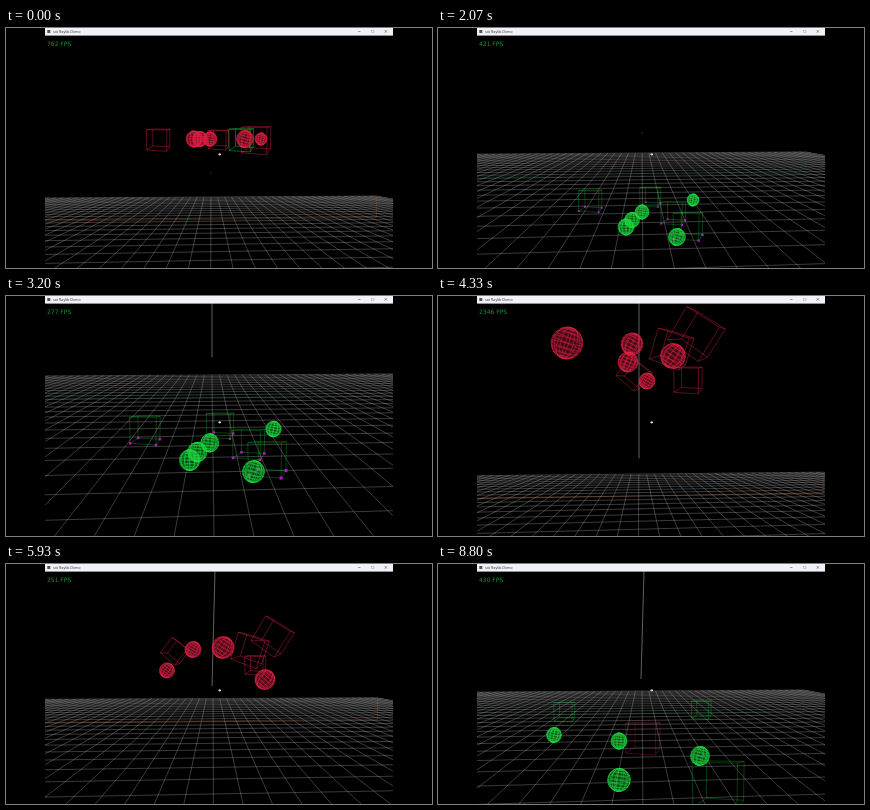
Animation, 426 px wide and 240 px high, one loop 8870 ms. Source, as an HTML page with a canvas:

```html
<!DOCTYPE html>
<html lang="en">
<head>
<meta charset="utf-8">
<title>Physics demo</title>
<style>
html, body { margin: 0; width: 100%; height: 100%; overflow: hidden; background: #000; }
canvas { display: block; width: 100vw; height: 100vh; }
</style>
</head>
<body>
<canvas id="stage"></canvas>
<script>
const canvas = document.getElementById('stage');
const ctx = canvas.getContext('2d');
const W = 426, H = 240, LOOP = 8870, STEPS = 133;
const CX = 213, CY = 126, FOCAL = 204, EYE = 4.6, HALF = 25;
const RED = '226,36,72', GREEN = '30,222,66', ORANGE = '170,92,36';
const LANDED = 22, LAUNCH = 54, SETTLED = 109;

const mix = (a, b, k) => a + (b - a) * k;
const clamp = k => Math.max(0, Math.min(1, k));
const smooth = k => k * k * (3 - 2 * k);
const linear = k => k;
const easeIn = k => k * k;
const easeOut = k => 1 - (1 - k) ** 2;

// Stops are [step, values, easing towards this stop].
function sample(stops, step) {
  let i = 1;
  while (i < stops.length - 1 && step >= stops[i][0]) i++;
  const [from, a] = stops[i - 1], [to, b, ease = smooth] = stops[i];
  const k = ease(clamp((step - from) / (to - from)));
  return a.map((v, n) => mix(v, b[n], k));
}

// Far edge of the floor, its vanishing point, and the frame rate
const camera = [
  [0, [169, 205, 762]],
  [31, [125, 204, 421]],
  [48, [79, 206, 277]],
  [65, [178, 201, 2346]],
  [89, [134.5, 207, 251]],
  [113, [127, 204, 781]],
  [132, [127, 204, 430]]
];

// Points are [x, y below the far edge, radius]; every body drops, is tossed and lands.
function body(rest, toss, fall, land, roll, spin = 0) {
  const [x, y, r] = rest;
  const near = [mix(205, x, 1.25), y * 1.15, r * 1.3];
  const end = [land[0] + roll, land[1], land[2]];
  const stops = [
    [0, [x, -58, r]], [15, rest, easeIn], [31, rest], [48, near], [LAUNCH, near],
    [65, toss, easeOut], [89, fall, linear], [107, land, easeIn], [113, land], [132, end, easeOut]
  ];
  return { stops, spin };
}

const balls = [
  body([188, 74, 8], [129, -131, 16], [20, -185, 16], [-40, -100, 16], 0),
  body([194, 67, 7.5], [190, -112, 10], [187, -49, 8], [181, 50, 8], 0),
  body([204, 59, 7], [194, -130, 11], [217, -51, 11], [197, 89, 11.5], -16),
  body([255, 47, 6], [209, -93, 8], [161, -28, 7.5], [130, 44, 7.5], -14),
  body([239, 84, 8.5], [235, -118, 12.5], [259, -19, 10], [260, 65, 9.5], 2)
];
const boxes = [
  body([153, 47, 9.5], [197, -100, 11], [170, -47, 9], [136, 20, 8.5], -9, .65),
  body([213, 43, 8.5], [251, -95, 11.5], [250, -34, 8.5], [264, 18, 8], 0),
  body([251, 72, 12], [260, -140, 18], [268, -62, 13.5], [279, 92, 21], 3, .55)
];
const marked = body([236, 59, 10], [235, -126, 15], [245, -49, 13], [210, 46, 14], -4, .3);

function line(x1, y1, x2, y2, color, width = .6) {
  ctx.strokeStyle = color;
  ctx.lineWidth = width;
  ctx.beginPath();
  ctx.moveTo(x1, y1);
  ctx.lineTo(x2, y2);
  ctx.stroke();
}

function text(s, x, y, font, color) {
  ctx.font = font;
  ctx.fillStyle = color;
  ctx.fillText(s, x, y);
}

const turn2 = (a, b, t) => [a * Math.cos(t) - b * Math.sin(t), a * Math.sin(t) + b * Math.cos(t)];

function rotate([x, y, z], yaw, tilt, roll) {
  [z, x] = turn2(z, x, yaw);
  [y, z] = turn2(y, z, tilt);
  [x, y] = turn2(x, y, roll);
  return [x, y, z];
}

function drawFloor(edge, mid, depth, rim) {
  const yaw = Math.atan((CX - mid) / FOCAL);
  const pitch = Math.atan((edge - CY) / FOCAL) - Math.atan(EYE / depth);
  const project = (x, z) => {
    const [px, pz] = turn2(x, z, yaw);
    const [d, y] = turn2(pz, EYE, pitch);
    return [CX + FOCAL * px / d, CY + FOCAL * y / d];
  };
  const color = 'rgba(195,195,195,.6)';
  for (let x = -HALF; x <= HALF; x++) line(...project(x, depth), ...project(x, 3), color, .5);
  for (let z = depth; z > 3; z--) line(...project(-HALF, z), ...project(HALF, z), color, .5);

  const [x, y] = project(HALF, depth);
  line(39, edge + 24, x, y + 21.5, rim);
  line(x, y + 21.5, x, y, rim);
}

function drawBall([x, y, r], turn, color) {
  ctx.fillStyle = `rgba(${color},.3)`;
  ctx.beginPath();
  ctx.arc(x, y, r, 0, 7);
  ctx.fill();
  ctx.strokeStyle = `rgba(${color},.78)`;
  ctx.lineWidth = .6;
  const ring = point => {
    ctx.beginPath();
    for (let i = 0; i <= 24; i++) {
      const [px, py] = rotate(point(i * Math.PI / 12), turn, .15, turn * .1);
      ctx.lineTo(x + px * r, y + py * r);
    }
    ctx.stroke();
  };
  for (let i = 1; i < 9; i++) {
    const a = i * Math.PI / 9;
    ring(b => [Math.sin(a) * Math.cos(b), Math.cos(a), Math.sin(a) * Math.sin(b)]);
  }
  for (let i = 0; i < 6; i++) {
    const a = i * Math.PI / 6;
    ring(b => [Math.sin(b) * Math.cos(a), Math.cos(b), Math.sin(b) * Math.sin(a)]);
  }
}

function drawBox([x, y, s], roll, color, touching) {
  const corners = [];
  for (let i = 0; i < 8; i++) {
    const c = [i & 1, i >> 1 & 1, i >> 2].map(v => v * 2 - 1);
    const [px, py, pz] = rotate(c, .25, .14, roll);
    const k = s / (1 + pz * .1);
    corners.push([x + px * k, y + py * k]);
  }
  corners.forEach((p, i) => {
    for (const bit of [1, 2, 4]) if (!(i & bit)) line(...p, ...corners[i | bit], color);
  });
  if (!touching) return;
  const size = s / 5;
  ctx.fillStyle = 'rgba(214,20,220,.85)';
  corners.forEach(([px, py], i) => {
    if (i & 2) ctx.fillRect(px - size / 2, py - size / 2, size, size);
  });
}

function drawWindow(fps) {
  ctx.fillStyle = '#f1f2f8';
  ctx.fillRect(39, 0, 348, 7.6);
  ctx.fillStyle = '#555';
  ctx.fillRect(41.3, 2, 3, 3);
  text('sat Raylib Demo', 47, 4.9, '3.7px "Open Sans", sans-serif', '#333');
  line(352, 3.5, 354.6, 3.5, '#444', .5);
  ctx.strokeStyle = '#aaa';
  ctx.strokeRect(365.7, 2.3, 2.3, 2.3);
  line(378.6, 2.2, 381, 4.6, '#333', .5);
  line(381, 2.2, 378.6, 4.6, '#333', .5);
  text(Math.round(fps) + ' FPS', 41, 18.3, '6px "DejaVu Sans", sans-serif', '#0a9a38');
}

function draw(step) {
  const [edge, mid, fps] = sample(camera, step);
  const awake = step < LANDED || step >= LAUNCH && step < SETTLED;
  const color = awake ? RED : GREEN;
  const depth = 30.2 - 4 * Math.exp(-(((step - 58) / 18) ** 2));
  const lift = clamp((step - LAUNCH) / 8) * (1 - smooth(clamp((step - 104) / 18)));
  const pose = ({ stops }) => {
    const [x, y, r] = sample(stops, step);
    return [x, edge + y, r];
  };

  ctx.fillStyle = '#000';
  ctx.fillRect(0, 0, W, H);
  ctx.save();
  ctx.beginPath();
  ctx.rect(39, 7.6, 348, H);
  ctx.clip();
  drawFloor(edge, mid, depth, awake ? `rgba(${ORANGE},.6)` : 'rgba(20,120,50,.4)');

  const tip = edge - Math.max(12, 24 - step * .13);
  const lean = smooth(clamp((step - 65) / 24));
  if (step < 38) line(mid - .5, tip, mid + .5, tip, '#555', 1);
  else line(mid + 2 * lean, 7, mid - lean, tip, '#6c6c6c', .9);

  const touching = step >= 15 && step < LAUNCH;
  const boxColor = `rgba(${color},${awake ? .68 : .45})`;
  for (const b of boxes) drawBox(pose(b), b.spin * lift, boxColor, touching);
  const tint = step < LAUNCH ? GREEN : RED;
  drawBox(pose(marked), marked.spin * lift, `rgba(${tint},${awake ? .68 : .45})`, touching);
  balls.forEach((b, n) => drawBall(pose(b), n * .7 + lift * step * .05, color));

  line(212.5, CY + .4, 215, CY + .4, '#eee', 1.3);
  line(213.8, CY - .8, 213.8, CY + 1.6, '#ddd', .8);
  ctx.restore();
  drawWindow(fps);
}

function resize() {
  const ratio = window.devicePixelRatio || 1;
  canvas.width = Math.round(innerWidth * ratio);
  canvas.height = Math.round(innerHeight * ratio);
  ctx.setTransform(canvas.width / W, 0, 0, canvas.height / H, 0, 0);
}

const start = performance.now();
function tick() {
  const t = (performance.now() - start) % LOOP;
  draw(Math.floor((t + 10) * STEPS / LOOP) % STEPS);
  requestAnimationFrame(tick);
}

resize();
addEventListener('resize', resize);
tick();
</script>
</body>
</html>
```
